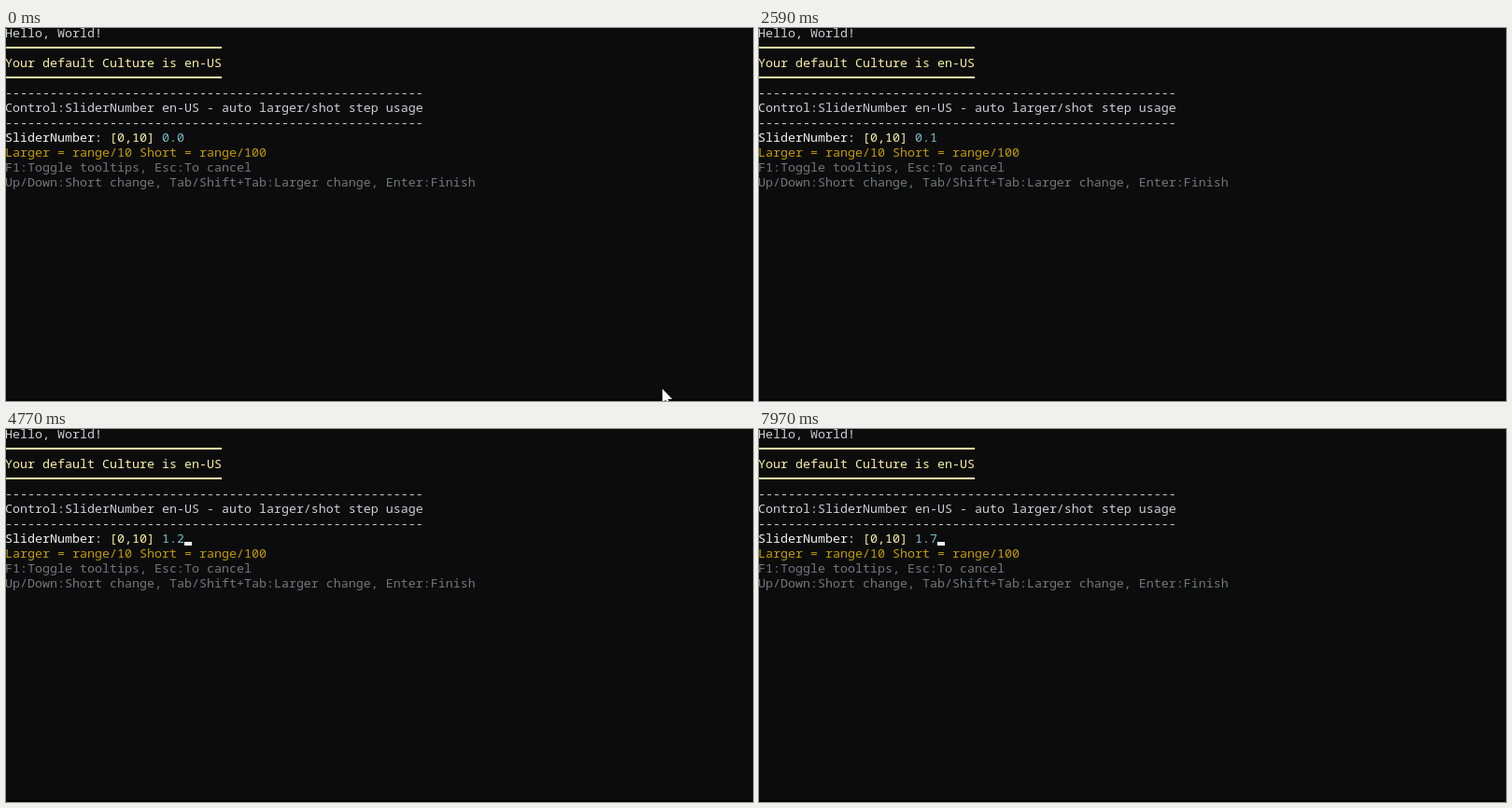
An HTML page that plays this animation: 800x400 px, repeating every 8 s.

```html
<!DOCTYPE html>
<html lang="en">
<head>
<meta charset="utf-8">
<title>Slider number prompt</title>
<style>
  html, body { margin: 0; width: 100%; height: 100%; overflow: hidden; background: #0c0c0c; }
  svg { display: block; }
  text { font: 13.3333px "Noto Sans Mono", "DejaVu Sans Mono", monospace; white-space: pre; fill: #ccd0d2; }
  .pale { fill: #f9f1a5; }
  .white { fill: #f2f2f2; }
  .value { fill: #78bccb; }
  .gold { fill: #c19c00; }
  .dim { fill: #72777d; }
</style>
</head>
<body>
<svg width="800" height="400" viewBox="0 0 800 400">
  <rect width="800" height="400" fill="#0c0c0c"/>
  <rect y="398" width="800" height="2" fill="#040404"/>
  <text x="-1" y="10">Hello, World!</text>
  <rect class="pale" y="20" width="231" height="2"/>
  <text class="pale" x="-1" y="42">Your default Culture is en-US</text>
  <rect class="pale" y="52" width="231" height="2"/>
  <text class="rule" x="-1" y="74"></text>
  <text x="-1" y="90">Control:SliderNumber en-US - auto larger/shot step usage</text>
  <text class="rule" x="-1" y="106"></text>
  <text class="white" x="-1" y="122">SliderNumber: <tspan class="pale">[0,10]</tspan></text>
  <text class="value" id="value" x="167" y="122">0.0</text>
  <text class="gold" x="-1" y="138">Larger = range/10 Short = range/100</text>
  <text class="dim" x="-1" y="154">F1:Toggle tooltips, Esc:To cancel</text>
  <text class="dim" x="-1" y="170">Up/Down:Short change, Tab/Shift+Tab:Larger change, Enter:Finish</text>
  <rect class="white" id="caret" x="191" y="121" width="8" height="4"/>
  <path id="mouse" fill="#fff" d="M0 0V15L3.4 11.8L6 17.6L8.4 16.5L5.9 10.9H10.5Z"/>
</svg>
<script>
const LOOP = 8000, TICK = 200;
const SHORT = 0.1, LARGER = 1;
const BLINK = 1060, BLINK_ON = 450, BLINK_START = 490;
const MOUSE_TICKS = 5, MOUSE_GONE = 8;

const [value, caret, mouse] = ["value", "caret", "mouse"].map(id => document.getElementById(id));
document.querySelectorAll(".rule").forEach(el => el.textContent = "-".repeat(56));

// Key presses: tick and change of the slider
const keys = [
  { at: 13, by: SHORT }, { at: 15, by: -SHORT },
  { at: 17, by: LARGER }, { at: 19, by: LARGER }, { at: 20, by: -LARGER }
];
// Then seven short steps up, slowing down
for (let n = 1; n <= 7; n++) keys.push({ at: 20 + Math.floor(0.26 * n * n + 0.9 * n), by: SHORT });

function show(el, on) {
  el.style.display = on ? "" : "none";
}

function draw(t) {
  // The screen refreshes once per tick, slightly early
  const tick = Math.floor((t + 30) / TICK);
  const pressed = keys.filter(key => key.at <= tick);
  const sum = pressed.reduce((total, key) => total + key.by, 0);
  value.textContent = Math.abs(sum).toFixed(1);

  // The caret blinks, and is hidden while a key press redraws the line
  const phase = (tick * TICK - BLINK_START + BLINK) % BLINK;
  show(caret, phase < BLINK_ON && tick > 0 && !keys.some(key => key.at === tick));

  const k = Math.min(1, tick / MOUSE_TICKS);
  show(mouse, tick < MOUSE_GONE);
  mouse.setAttribute("transform", `translate(${703 + 27 * k} ${387 - 197 * k})`);
}

const begin = performance.now();
function run() {
  draw((performance.now() - begin) % LOOP);
  requestAnimationFrame(run);
}
run();
</script>
</body>
</html>
```
